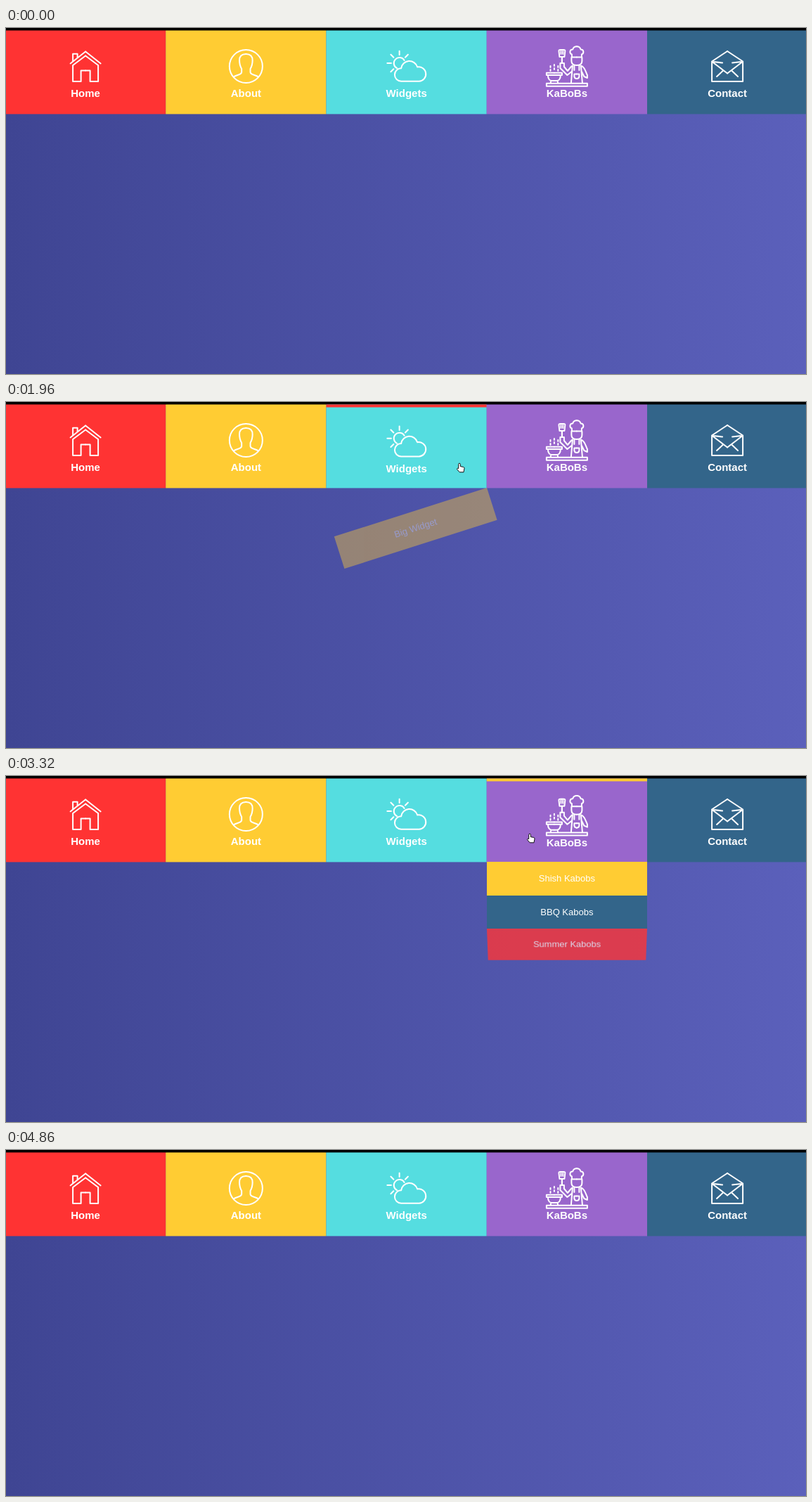
Animation, 1138 px wide and 492 px high, one loop 5060 ms. Source, as an HTML page:

```html
<!DOCTYPE html>
<html lang="en">
<head>
<meta charset="utf-8">
<title>Drop-down menu</title>
<style>
  html, body { margin: 0; width: 100%; height: 100%; overflow: hidden; }
  body {
    position: relative;
    background: linear-gradient(90deg, #3f4593, #5b60bb);
    font-family: "Liberation Sans", Arial, sans-serif;
  }
  svg { position: absolute; left: 0; top: 0; }
  svg text { font-size: 15px; font-weight: bold; text-anchor: middle; fill: #fff; }
  .icon { fill: none; stroke: #fff; stroke-width: 2; stroke-linejoin: round; stroke-linecap: round; }
  .item {
    position: absolute; display: none;
    color: #fff; font-size: 13px; text-align: center; white-space: nowrap;
  }
  #pointer { fill: #fff; stroke: #111; stroke-linejoin: round; }
</style>
</head>
<body>
<svg id="nav" width="1138" height="492"><rect width="1138" height="4"/></svg>
<svg id="overlay" width="1138" height="492">
  <g id="pointer">
    <path id="arrow" d="M.5 .5V11.2L3 8.9 4.7 12.5 6.5 11.7 4.9 8.2H8Z"/>
    <path id="hand" d="M-1.3 7.5V1.4Q-1.3 .2 0 .2T1.3 1.4V4.6L5.6 5.4Q7 5.8 7 7.2L6 12.8H.2L-3.5 8.6Q-3.4 6.4-1.3 7.5Z"/>
  </g>
</svg>
<script>
const LOOP = 5060;
const TAB_WIDTH = 228.25, NAV_TOP = 3.5, NAV_BOTTOM = 122.4, ROW = 47.5;
const RED = '#ff3333', YELLOW = '#ffcc33', CYAN = '#55dde0', PURPLE = '#9966cc', BLUE = '#33658a';
const rowColors = [YELLOW, BLUE, RED];

const byId = id => document.getElementById(id);
const clamp = v => Math.max(0, Math.min(1, v));
const mix = (a, b, p) => a + (b - a) * p;

function svg(parent, tag, attrs = {}) {
  const el = document.createElementNS('http://www.w3.org/2000/svg', tag);
  for (const key in attrs) el.setAttribute(key, attrs[key]);
  return parent.appendChild(el);
}

// Icons are drawn around x = 0; symmetric parts are given as a left half.
const line = (g, d) => svg(g, 'path', { d });
function mirrored(g, axis, d) {
  for (const side of [1, -1]) svg(g, 'path', { d, transform: `translate(${axis} 0) scale(${side} 1)` });
}

function house(g) {
  mirrored(g, 0, 'M-21.5 50.5 0 33.5');
  mirrored(g, 0, 'M0 39.5-18 53V76H-6.5V60.5H0');
  line(g, 'M-18 47V36.8H-11.5V42');
}

function person(g) {
  svg(g, 'circle', { cy: 54.5, r: 23.5 });
  mirrored(g, 0, 'M0 37C-6 37-9.3 40-9.3 46S-8 55-6.2 58V63C-7 67-14 66.5-17.5 69.5');
}

function weather(g) {
  for (let angle = 135; angle <= 315; angle += 45) {
    svg(g, 'path', { d: 'M11.7 0H17.3', transform: `translate(-10 50) rotate(${angle})` });
  }
  line(g, 'M-13.5 57.2A8 8 0 1 1-3 46');
  line(g, 'M-7.5 75.7A9.2 9.2 0 0 1-7.5 57.3A11.8 11.8 0 0 1 15.5 55.5A10.2 10.2 0 1 1 18 75.7Z');
}

function chef(g) {
  const cook = 14, pot = -18, spatula = -7;
  line(g, 'M-29 78.7H29V82.7H-29Z');
  mirrored(g, pot, 'M0 63.8H-11V67H0M-9 67C-9 73-6 75-4 75H0M-5 75V78');
  for (let i = -1; i <= 1; i++) {
    const top = i ? 54 : 52;
    line(g, `M${pot + i * 5.4} ${top}v2m0 3v2`);
  }
  mirrored(g, spatula, 'M0 31H-2.5Q-4.7 31-4.4 33L-3.5 41H0V50M-1.4 33V37');
  mirrored(g, cook, 'M0 26.3C-3.5 26.3-5 28-5.7 30.5-10.5 30.5-10.5 36.5-7 37.5V41.5H0');
  mirrored(g, cook, 'M-7.5 42V47Q-7.5 53 0 53M-6 54-8 78M-3.5 53V60M0 65.5H-3.5V69Q-3 72 0 72');
  line(g, 'M8 53.5 6.5 54.5 1 61-4 55V50H-9.5V57L.5 67 6.8 62');
  line(g, 'M19.5 53.5C24 54 26 60 29 67V71L24.5 69 21 62');
}

function envelope(g) {
  mirrored(g, 0, 'M0 33-22 47.5V76H0M-21 48.5 0 64.5M-6 60.5-15 69M-20 48-7 49.5');
}

const swing = { duration: 290, stagger: 160, origin: '100% 0', pose: left => `rotate(${-30 * left}deg)` };
const unfold = {
  duration: 280, stagger: 130, origin: '50% 0',
  pose: left => `perspective(1000px) rotateX(${-90 * left}deg)`
};

const tabs = [
  { label: 'Home', color: RED, icon: house },
  { label: 'About', color: YELLOW, icon: person },
  { label: 'Widgets', color: CYAN, accent: RED, icon: weather, drop: swing,
    rows: ['Big Widget', 'Bigger Widget', 'Huge Widget'] },
  { label: 'KaBoBs', color: PURPLE, accent: YELLOW, icon: chef, drop: unfold,
    rows: ['Shish Kabobs', 'BBQ Kabobs', 'Summer Kabobs'] },
  { label: 'Contact', color: BLUE, icon: envelope }
];

function buildItem(tab, label, i) {
  const el = document.createElement('div');
  el.className = 'item';
  el.textContent = label;
  Object.assign(el.style, {
    left: tab.x + 'px', top: NAV_BOTTOM + i * ROW + 'px',
    width: TAB_WIDTH + 'px', height: ROW + 'px', lineHeight: ROW + 'px',
    background: rowColors[i], transformOrigin: tab.drop.origin
  });
  document.body.insertBefore(el, byId('overlay'));
  return el;
}

tabs.forEach((tab, i) => {
  tab.x = i * TAB_WIDTH - 1;
  tab.mid = tab.x + TAB_WIDTH / 2;
  const nav = byId('nav');
  const box = { x: tab.x, y: NAV_TOP, width: TAB_WIDTH };
  svg(nav, 'rect', { ...box, height: NAV_BOTTOM - NAV_TOP, fill: tab.color });
  tab.bar = svg(nav, 'rect', { ...box, height: 4, fill: tab.accent || 'none' });
  tab.content = svg(nav, 'g');
  tab.icon(svg(tab.content, 'g', { class: 'icon' }));
  svg(tab.content, 'text', { y: 98 }).textContent = tab.label;
  tab.items = (tab.rows || []).map((label, row) => buildItem(tab, label, row));
});

// Where the pointer rests; it moves evenly from one stop to the next.
const stops = [
  { from: 0, to: 70, x: 1098, y: 478 },
  { from: 200, to: 400, x: 943, y: 293 },
  { from: 970, to: 1500, x: 837.5, y: 99 },
  { from: 1928, to: 2600, x: 645, y: 87 },
  { from: 3217, to: 3217, x: 745, y: 82 },
  { from: 3340, to: 3340, x: 745, y: 82 },
  { from: 3938, to: 4230, x: 558, y: 72.5 },
  { from: 4790, to: LOOP, x: 1107, y: 481 }
];

function pointerAt(t) {
  const k = stops.findLastIndex(s => s.from <= t);
  const a = stops[k], b = stops[k + 1] || a;
  const p = b === a ? 0 : clamp((t - a.to) / (b.from - a.to));
  return { x: mix(a.x, b.x, p), y: mix(a.y, b.y, p) };
}

const inColumn = (tab, x, inset = 0) => x >= tab.x + inset && x < tab.x + TAB_WIDTH - inset;

// A tab stays open while the pointer is on it or on its open rows.
function findHovers() {
  const list = [{ since: 0, tab: null }];
  for (let t = 0; t < LOOP; t++) {
    const { x, y } = pointerAt(t);
    const current = list[list.length - 1].tab;
    const over = tabs.find(tab => inColumn(tab, x) &&
      y < NAV_BOTTOM + (tab === current ? tab.items.length * ROW : 0)) || null;
    if (over !== current) list.push({ since: t, tab: over });
  }
  return list;
}
const hovers = findHovers();

function showTab(tab, active, elapsed) {
  tab.bar.style.display = active ? '' : 'none';
  tab.content.setAttribute('transform', `translate(${tab.mid} ${active ? 1.7 : 0})`);
  tab.items.forEach((el, i) => {
    const p = clamp((elapsed - i * tab.drop.stagger) / tab.drop.duration);
    el.style.display = active && p > 0 ? 'block' : 'none';
    el.style.opacity = p;
    el.style.transform = p < 1 ? tab.drop.pose(1 - p) : 'none';
  });
}

function showPointer(t, hovered) {
  const { x, y } = pointerAt(t);
  const onLink = hovered && inColumn(hovered, x, 2);
  byId('pointer').style.display = t >= 70 && t < 4860 ? '' : 'none';
  byId('pointer').setAttribute('transform', `translate(${x} ${y})`);
  byId('hand').style.display = onLink ? '' : 'none';
  byId('arrow').style.display = onLink ? 'none' : '';
}

function draw(t) {
  const { since, tab: hovered } = hovers.findLast(h => h.since <= t);
  for (const tab of tabs) showTab(tab, tab === hovered, t - since);
  showPointer(t, hovered);
}

const start = performance.now();
function tick() {
  draw((performance.now() - start) % LOOP);
  requestAnimationFrame(tick);
}
tick();
</script>
</body>
</html>
```
